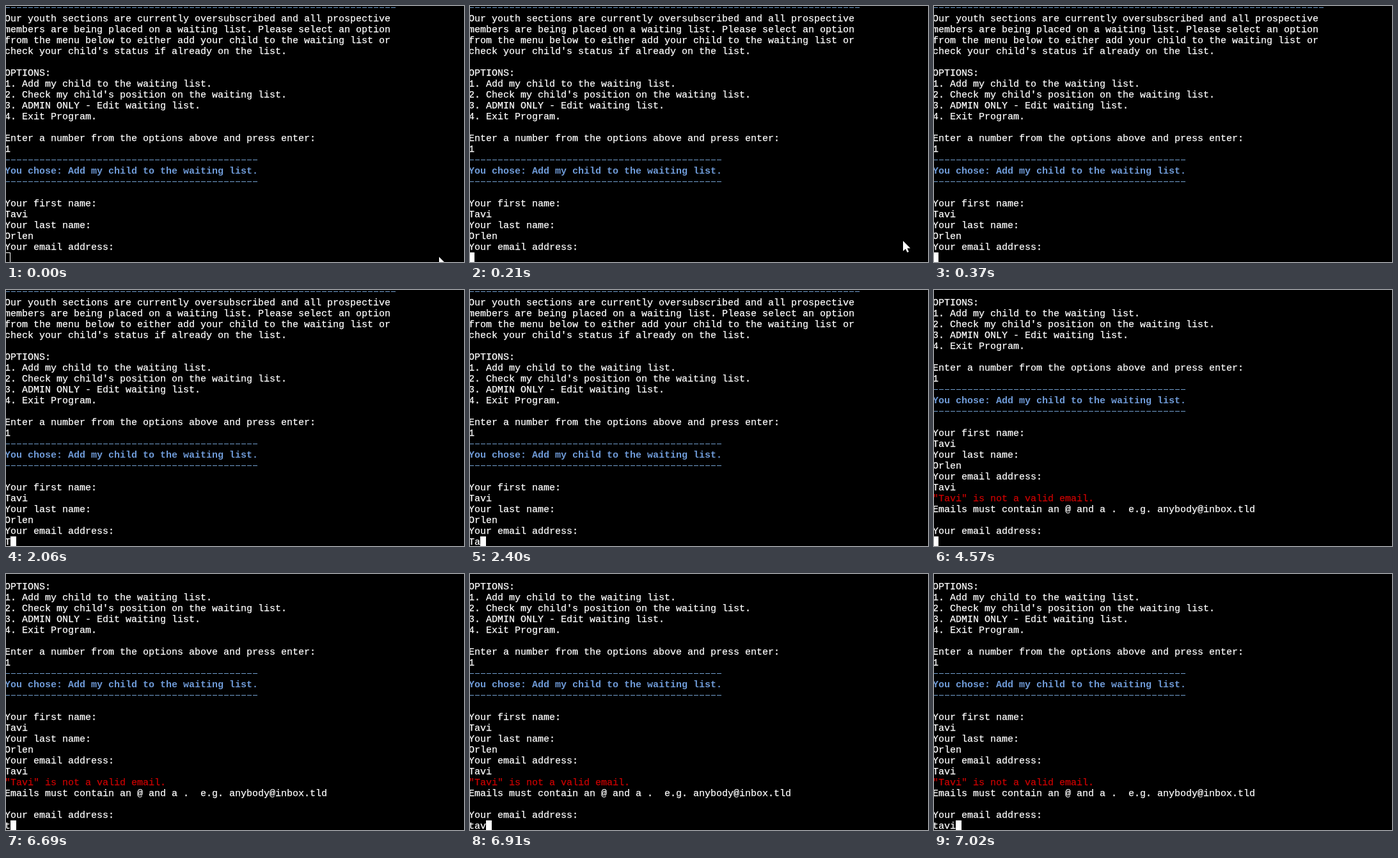
These frames come from a looping animation (716 px wide and 400 px high, 8 s). An HTML page:

```html
<!DOCTYPE html>
<html lang="en">
<head>
<meta charset="utf-8">
<title>Waiting list terminal</title>
<style>
  html, body { margin: 0; width: 100%; height: 100%; overflow: hidden; background: #000; }
  #stage { position: relative; width: 716px; height: 400px; overflow: hidden; background: #000; }
  #screen {
    position: absolute; left: -2px; top: -6px;
    font: 15px/19px "Liberation Mono", "Courier New", monospace;
    font-variant-ligatures: none; color: #fff;
    -webkit-text-stroke: 0.25px;
  }
  .row { height: 17px; white-space: pre; }
  .blue { color: #6f9bd8; font-weight: bold; -webkit-text-stroke: 0; }
  .red { color: #cc0000; }
  .rule {
    background: repeating-linear-gradient(90deg, #0000 0 1px, #729fcf 1px 8px, #0000 8px 9px)
      0 8px / 100% 1px no-repeat;
  }
  #caret { position: absolute; top: 385px; width: 9px; height: 17px; box-sizing: border-box; border: 1px solid #fff; }
  #mouse { position: absolute; left: 0; top: 0; overflow: visible; }
</style>
</head>
<body>
<div id="stage">
  <div id="screen"></div>
  <div id="caret"></div>
  <svg id="mouse" width="12" height="19"><path d="M0 0V16L4 12.5L6.5 18L9 17L6.5 11.5H11.5Z" fill="#fff"/></svg>
</div>
<script>
const LOOP = 8000, CELL = 9, ROW = 17, LEFT = -2;
const FOCUS = 195, SCROLL = 4570, SCROLL_ROWS = 5;
const first = 'Tavi', last = 'Orlen';

const inputs = [
  { text: first, keys: [2060, 2400, 2580, 2690] },
  { text: first.toLowerCase(), keys: [6690, 6760, 6910, 7020] }
];

const $ = id => document.getElementById(id);
const screen = $('screen'), caret = $('caret'), mouse = $('mouse');

function row(text = '', kind = '') {
  const el = document.createElement('div');
  el.className = 'row ' + kind;
  el.textContent = text;
  screen.append(el);
  return el;
}

function rule(cells) {
  row('', 'rule').style.width = cells * CELL + 'px';
}

const print = text => text.split('\n').forEach(line => row(line));

rule(68);
print(`Our youth sections are currently oversubscribed and all prospective
members are being placed on a waiting list. Please select an option
from the menu below to either add your child to the waiting list or
check your child's status if already on the list.

OPTIONS:
1. Add my child to the waiting list.
2. Check my child's position on the waiting list.
3. ADMIN ONLY - Edit waiting list.
4. Exit Program.

Enter a number from the options above and press enter:
1`);
rule(44);
row('You chose: Add my child to the waiting list.', 'blue');
rule(44);
print(`
Your first name:
${first}
Your last name:
${last}
Your email address:`);
inputs[0].el = row();
row(`"${first}" is not a valid email.`, 'red');
print(`Emails must contain an @ and a .  e.g. anybody@inbox.tld

Your email address:`);
inputs[1].el = row();

// The pointer rises to click the terminal, then leaves through the bottom edge.
function moveMouse(t) {
  const step = t < 20 ? 0 : Math.min(9, 1 + Math.floor((t - 20) / 43.75));
  const rise = Math.sin(Math.PI * Math.min(step, 8) / 8);
  mouse.style.transform = `translate(677px, ${Math.round(392 - 27 * rise)}px)`;
  mouse.style.visibility = step < 9 ? 'visible' : 'hidden';
}

function draw(t) {
  const scrolled = t >= SCROLL;
  screen.style.transform = `translateY(${scrolled ? -SCROLL_ROWS * ROW : 0}px)`;
  const counts = inputs.map(({ el, text, keys }) => {
    const n = keys.filter(k => t >= k).length;
    el.textContent = text.slice(0, n);
    return n;
  });
  caret.style.left = LEFT + CELL * counts[scrolled ? 1 : 0] + 'px';
  caret.style.background = t >= FOCUS ? '#fff' : 'none';
  moveMouse(t);
}

const start = performance.now();
function tick() {
  draw((performance.now() - start) % LOOP);
  requestAnimationFrame(tick);
}
draw(0);
requestAnimationFrame(tick);
</script>
</body>
</html>
```
